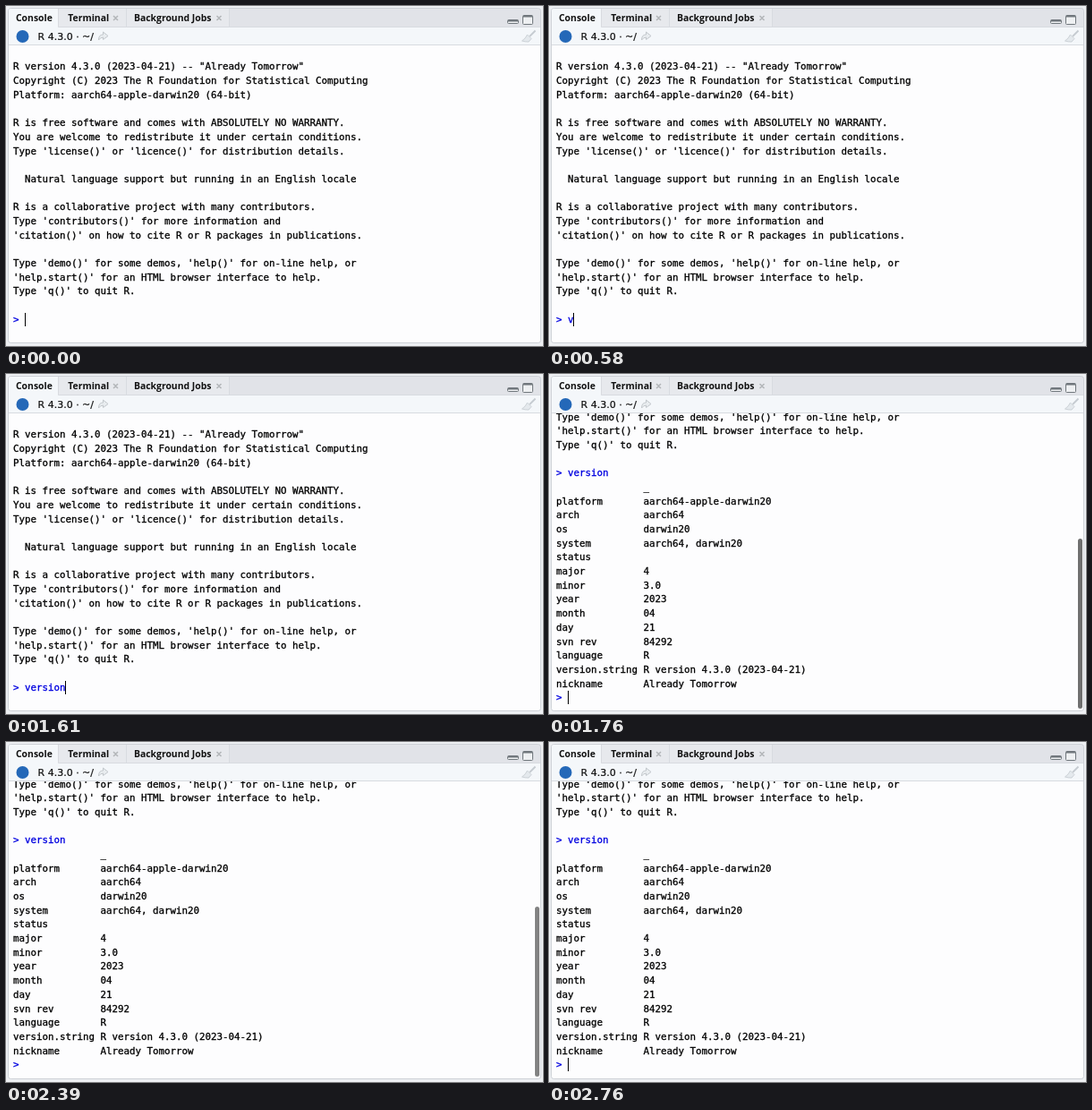
An HTML page for the animation above (2.79 s loop, 600 px wide and 380 px high).

```html
<!DOCTYPE html>
<html lang="en">
<head>
<meta charset="utf-8">
<title>R console</title>
<style>
  :root { --row: 15.69px; --loop: 2790ms infinite; }
  html, body { margin: 0; width: 100%; height: 100%; overflow: hidden; }
  body { position: relative; background: #eef0f3; }
  .chrome { position: absolute; left: 0; top: 0; }
  .tab { font: bold 10.4px "Open Sans", "Noto Sans", sans-serif; fill: #111; }
  .path { font: 11px "DejaVu Sans", sans-serif; fill: #111; stroke: #111; stroke-width: .2px; }

  .console {
    position: absolute; left: 3px; top: 44px; width: 594px; height: 332px;
    overflow: hidden; background: #fdfdfe; border-radius: 0 0 3px 3px;
  }
  pre {
    position: absolute; left: 5px; top: 16.4px; margin: 0; color: #000;
    font: 10.8px/var(--row) "DejaVu Sans Mono", monospace;
    -webkit-text-stroke: .3px;
    animation: scroll var(--loop) step-end;
  }
  pre b { font-weight: normal; color: #0000e0; }
  .output { visibility: hidden; animation: show var(--loop) step-end; }
  .typed {
    position: absolute; left: 2ch; top: calc(18 * var(--row));
    overflow: hidden; animation: type var(--loop) step-end;
  }
  .caret {
    position: absolute; left: 2ch; top: calc(18 * var(--row));
    width: 1.6px; height: var(--row); margin-left: -.3px;
    animation: move var(--loop) step-end;
  }
  .caret i {
    display: block; height: 100%; background: #000;
    animation: blink var(--loop) linear;
  }
  .thumb {
    position: absolute; left: 588px; top: 140px; width: 5px; height: 190px;
    border-radius: 3px; background: #707070; visibility: hidden;
    animation: show var(--loop) step-end, fade var(--loop) ease-in-out;
  }

  @keyframes scroll {
    0% { top: 16.4px; }
    63.08% { top: -223.1px; }
    64.16%, 100% { top: -224.1px; }
  }
  @keyframes show {
    0% { visibility: hidden; }
    63.08%, 100% { visibility: visible; }
  }
  @keyframes fade {
    0%, 82.4% { opacity: 1; }
    95.3%, 100% { opacity: 0; }
  }
  @keyframes type {
    0% { width: 0; }
    18.63% { width: 1ch; }
    29.39% { width: 2ch; }
    32.97% { width: 3ch; }
    36.91% { width: 4ch; }
    41.21% { width: 5ch; }
    45.51% { width: 6ch; }
    53.04%, 100% { width: 7ch; }
  }
  @keyframes move {
    0% { left: 2ch; }
    18.63% { left: 3ch; }
    29.39% { left: 4ch; }
    32.97% { left: 5ch; }
    36.91% { left: 6ch; }
    41.21% { left: 7ch; }
    45.51% { left: 8ch; }
    53.04% { left: 9ch; top: calc(18 * var(--row)); }
    63.08%, 100% { left: 2ch; top: calc(34 * var(--row)); }
  }
  @keyframes blink {
    0%, 1.07% { opacity: 1; }
    6.45%, 14.3% { opacity: 0; }
    18.63%, 79.2% { opacity: 1; }
    84.58%, 93.54% { opacity: 0; }
    98.91%, 100% { opacity: 1; }
  }
</style>
</head>
<body>
<svg class="chrome" width="600" height="380" viewBox="0 0 600 380">
  <rect x="2.5" y="2.5" width="595" height="374" rx="3" fill="#e1e3e8" stroke="#cdd0d6"/>
  <path d="M58 3H249V24H58Z" fill="#e7e9ed"/>
  <path d="M3 24V5q0-2 2-2H58V24H597V44H3Z" fill="#f4f7fa"/>
  <path d="M58.5 3V23.5H597M134.5 3V23M249.5 3V23M3 43.5H597" fill="none" stroke="#d8dbe0"/>

  <g class="tab">
    <text x="11" y="17">Console</text>
    <text x="69.3" y="17">Terminal</text>
    <text x="143" y="17">Background Jobs</text>
  </g>
  <path d="M120 11l5 5m0-5l-5 5M235.5 11l5 5m0-5l-5 5" stroke="#b3b6b9" stroke-width="1.5"/>

  <!-- minimise and maximise -->
  <g fill="#eef0f2" stroke="#70777c">
    <rect x="560.5" y="15.5" width="12" height="4" rx="1"/>
    <rect x="577.5" y="10.5" width="11" height="10" rx="1"/>
    <path d="M561 16.5H572M578 11.5H588" stroke-width="2"/>
  </g>

  <circle cx="18.5" cy="34" r="7" fill="#2468b8"/>
  <text class="path" x="35.5" y="38">R 4.3.0 · ~/</text>
  <path d="M103.5 38q0-6 5-6V29l5.5 4.5-5.5 4V35q-3 0-5 3Z" fill="#e9edf0" stroke="#c3c8cc"/>

  <!-- broom -->
  <path d="M591.5 27.5L585 34" stroke="#c5cbd1" stroke-width="1.8"/>
  <path d="M582.5 32l4.5 4.5-3 3.5q-4 0-7.5-1 4-2.5 6-7Z" fill="#e4e9ed" stroke="#ccd2d7"/>
</svg>

<div class="console">
<pre>R version 4.3.0 (2023-04-21) -- "Already Tomorrow"
Copyright (C) 2023 The R Foundation for Statistical Computing
Platform: aarch64-apple-darwin20 (64-bit)

R is free software and comes with ABSOLUTELY NO WARRANTY.
You are welcome to redistribute it under certain conditions.
Type 'license()' or 'licence()' for distribution details.

  Natural language support but running in an English locale

R is a collaborative project with many contributors.
Type 'contributors()' for more information and
'citation()' on how to cite R or R packages in publications.

Type 'demo()' for some demos, 'help()' for on-line help, or
'help.start()' for an HTML browser interface to help.
Type 'q()' to quit R.

<b>&gt;</b>
<span class="output">               _
platform       aarch64-apple-darwin20
arch           aarch64
os             darwin20
system         aarch64, darwin20
status
major          4
minor          3.0
year           2023
month          04
day            21
svn rev        84292
language       R
version.string R version 4.3.0 (2023-04-21)
nickname       Already Tomorrow
<b>&gt;</b></span><b class="typed">version</b><span class="caret"><i></i></span></pre>
<div class="thumb"></div>
</div>
</body>
</html>
```
